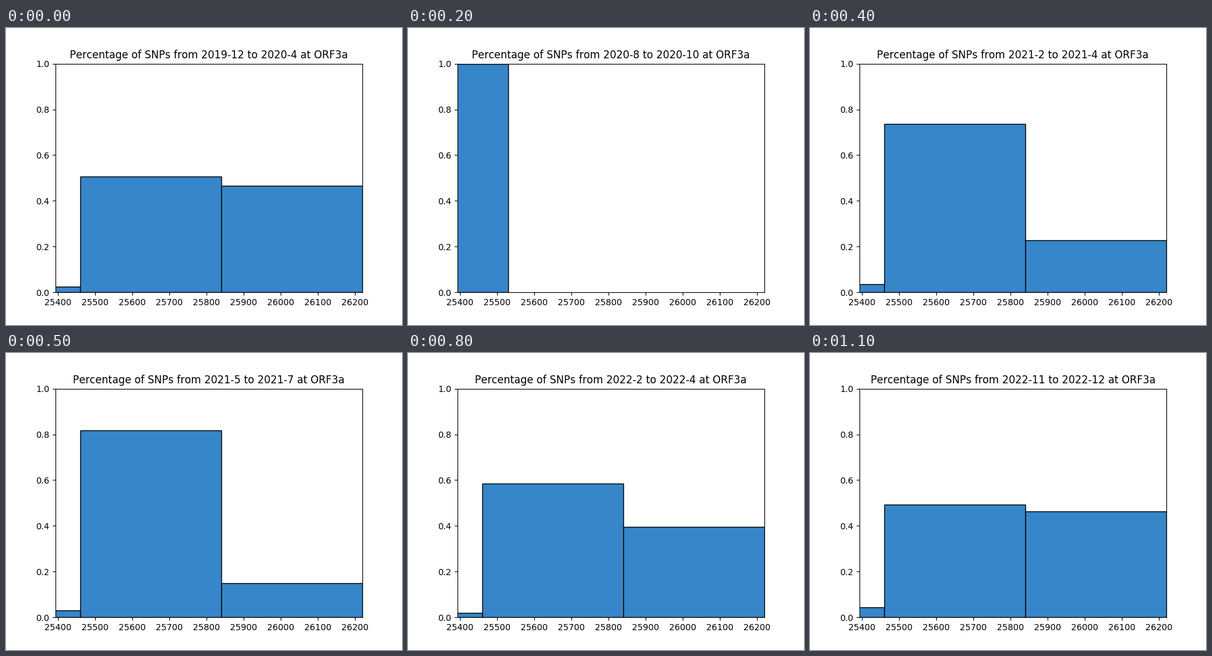
Recreate the animation shown at these times as a matplotlib script. Size 640x480 px, loop 1200 ms.

```python
import matplotlib.pyplot as plt
import numpy as np
from matplotlib.animation import FuncAnimation

PERIODS = 12
GENE = (25393, 26220)
BLUE = "#3786c9"

# Shares of the first two bins at key periods; the third takes the rest
KEYS = [0, 3, 5, 9, 11]
FIRST = [0.0255, 0.039, 0.0315, 0.014, 0.043]
SECOND = [0.5075, 0.656, 0.818, 0.509, 0.493]

# Periods whose samples fall into other bins: start, width, first two shares
SHIFTED = {2: (25150, 380, 1, 0), 7: (25350, 390, 0.867, 0.125)}


def histogram(i):
    if i in SHIFTED:
        return SHIFTED[i]
    return 25080, 380, np.interp(i, KEYS, FIRST), np.interp(i, KEYS, SECOND)


def month(n):
    """Label for the n-th month counted from January 2020."""
    return f"{2020 + n // 12}-{n % 12 + 1}"


def title(i):
    first = 3 * i + 1 if i else -1
    last = min(3 * i + 3, 35)
    return f"Percentage of SNPs from {month(first)} to {month(last)} at ORF3a"


plt.rcParams["text.kerning_factor"] = 6
fig, ax = plt.subplots(figsize=(6.4, 4.8), dpi=100)
bars = ax.bar(range(3), [0] * 3, color=BLUE, edgecolor="black", linewidth=1)
ax.set_xlim(*GENE)
ax.set_ylim(0, 1)


def update(i):
    left, width, first, second = histogram(i)
    shares = first, second, 1 - first - second
    for k, (bar, share) in enumerate(zip(bars, shares)):
        bar.set_bounds(left + k * width, 0, width, share)
        bar.set_visible(share > 0)
    ax.set_title(title(i))
    return [*bars, ax.title]


anim = FuncAnimation(fig, update, frames=PERIODS, interval=100, repeat=True)
plt.show()
```
